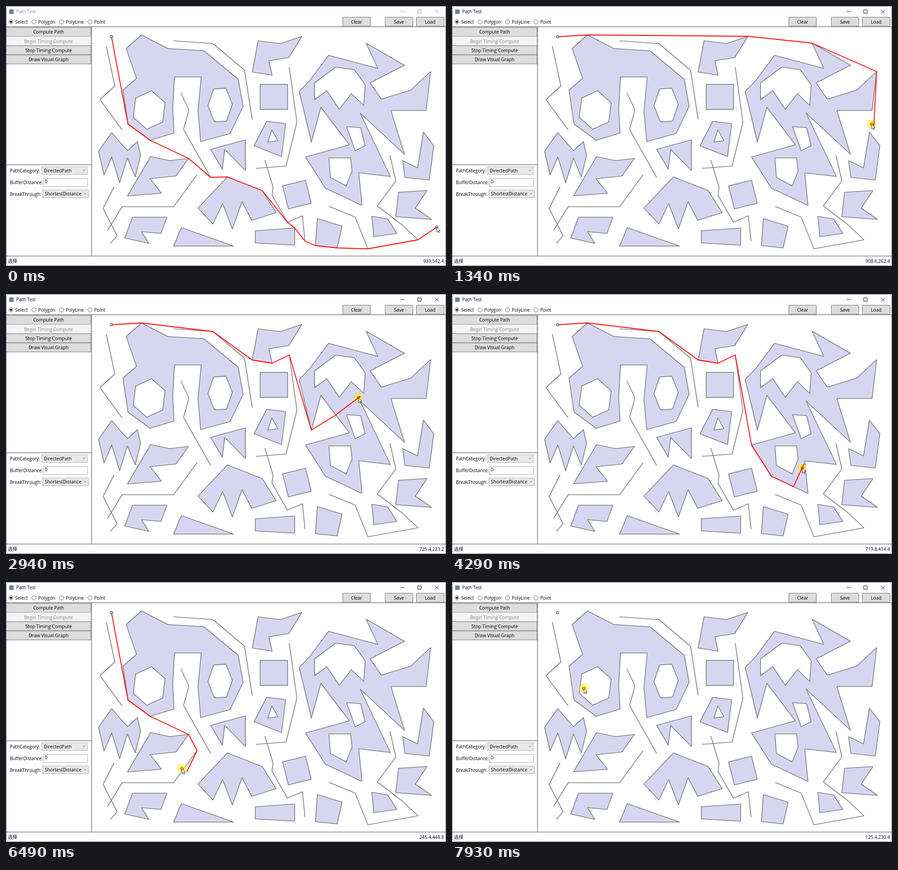
These frames come from a looping animation (974 px wide and 575 px high, 8000 ms). An HTML page with a canvas:

```html
<!DOCTYPE html>
<html lang="en">
<head>
<meta charset="utf-8">
<title>Path Test</title>
<style>
html, body { margin: 0; width: 100%; height: 100%; overflow: hidden; background: #fff; }
canvas { display: block; }
</style>
</head>
<body>
<canvas id="stage" width="974" height="575"></canvas>
<script>
const ctx = document.getElementById('stage').getContext('2d');
const LOOP = 8000, STEP = 79.3, LAST_STEP = 100;
const GREY = '#808080', LAVENDER = '#d7d6f1';

const cross = (a, b, c) => (b.x - a.x) * (c.y - a.y) - (b.y - a.y) * (c.x - a.x);
const dist = (a, b) => Math.hypot(a.x - b.x, a.y - b.y);
const mix = (a, b, t) => ({ x: a.x + (b.x - a.x) * t, y: a.y + (b.y - a.y) * t });
const edgesOf = pts => pts.filter(p => p.next).map(p => [p, p.next]);

function points(...xy) {
  const pts = [];
  for (let i = 0; i < xy.length; i += 2) pts.push({ x: xy[i], y: xy[i + 1] });
  return pts;
}

function ring(n, cx, cy, rx, ry, turn) {
  return Array.from({ length: n }, (_, i) => {
    const a = (turn + 360 * i / n) * Math.PI / 180;
    return { x: cx + rx * Math.cos(a), y: cy + ry * Math.sin(a) };
  });
}

// Two gaps of the given depth between a and b; the middle tooth is the longest.
function teeth(ax, ay, bx, by, depth) {
  return [0, 1, 2, 3, 4].map(i => {
    const p = mix({ x: ax, y: ay }, { x: bx, y: by }, i / 4);
    p.y += i % 2 ? -depth : 15 * Math.sin(Math.PI * i / 4);
    return p;
  });
}

function link(pts, closed) {
  pts.forEach((p, i) => {
    p.prev = pts[i - 1] || (closed ? pts[pts.length - 1] : null);
    p.next = pts[i + 1] || (closed ? pts[0] : null);
  });
  return pts;
}

function addTo(path, pts, closed) {
  pts.forEach((p, i) => i ? path.lineTo(p.x, p.y) : path.moveTo(p.x, p.y));
  if (closed) path.closePath();
  return path;
}

const blocks = [], walls = [];

function block(...rings) {
  const shape = new Path2D();
  rings.forEach(r => addTo(shape, link(r, true), true));
  blocks.push({ outline: rings[0], edges: rings.flatMap(edgesOf), shape });
}

const wall = (...xy) => walls.push(link(points(...xy), false));

// Outlines run clockwise; further rings are holes.
function buildMap() {
  block(
    points(300, 64, 358, 94, 438, 99, 514, 162, 525, 222, 496, 282, 431, 300, 425, 233, 432, 157,
      373, 157, 369, 227, 372, 281, 319, 297, 270, 261, 259, 186, 289, 160, 266, 94),
    ring(6, 317, 230, 38, 43, -82),
    ring(6, 474, 219, 27, 42, -62));
  block(points(558, 77, 608, 83, 655, 67, 626, 114, 582, 121, 589, 153, 545, 146));
  block(ring(4, 593, 201, 43, 39, -135));
  block(points(577, 255, 619, 260, 610, 333, 549, 309), ring(3, 590, 291, 13, 17, -97));
  block(points(453, 317, 530, 296, 530, 364, 484, 317, 479, 361));
  block([...points(205, 321, 234, 280, 269, 320, 291, 300, 298, 331), ...teeth(286, 378, 217, 374, 41)]);
  block(points(320, 333, 362, 342, 404, 337, 376, 376, 319, 382, 344, 414, 269, 420));
  block([...points(425, 447, 490, 378, 567, 408, 598, 457), ...teeth(544, 474, 458, 482, 43)]);
  block(points(280, 467, 356, 467, 343, 503, 300, 499, 316, 525, 263, 513));
  block(points(388, 490, 504, 531, 371, 531));
  block(points(552, 497, 639, 491, 639, 529, 552, 524));
  block(ring(4, 644, 417, 37, 37, -149));
  block(points(689, 470, 744, 487, 733, 535, 685, 530));
  block(points(810, 465, 845, 471, 865, 503, 814, 510));
  block(points(869, 412, 932, 408, 906, 447, 942, 472, 863, 466));
  block(points(924, 279, 947, 309, 937, 385, 883, 379, 878, 342, 911, 358));
  block(
    points(714, 109, 823, 138, 797, 82, 882, 131, 806, 170, 831, 206, 896, 186, 940, 145, 930, 231,
      852, 231, 882, 328, 784, 237, 851, 377, 781, 369, 788, 441, 707, 403, 663, 334, 760, 307,
      697, 224, 676, 301, 649, 189, 674, 163),
    [...points(683, 170, 730, 135, 771, 141, 795, 174), ...teeth(792, 220, 683, 207, 23)],
    points(754, 267, 785, 269, 795, 309, 773, 320),
    points(715, 336, 763, 336, 766, 365, 753, 398, 718, 379));

  wall(222, 89, 241, 177, 208, 207, 257, 274);
  wall(371, 77, 458, 83, 528, 142, 545, 251);
  wall(387, 192, 405, 230, 393, 273, 453, 379);
  wall(627, 135, 644, 257, 620, 354, 553, 359);
  wall(239, 400, 215, 448, 246, 508, 231, 525);
  wall(423, 373, 371, 444, 257, 444, 225, 496);
  wall(573, 341, 591, 400, 589, 419, 623, 478, 656, 464, 662, 520);
  wall(715, 443, 773, 467, 801, 537, 912, 517, 878, 485, 822, 442, 863, 387, 850, 330);
}

buildMap();
const edges = [...blocks.flatMap(b => b.edges), ...walls.flatMap(edgesOf)];
const start = { x: 233.5, y: 68 };
const isConvex = p => cross(p.prev, p, p.next) > 0;
const nodes = [start, ...blocks.flatMap(b => b.outline.filter(isConvex)), ...walls.flat()];

function blocked(a, b) {
  for (const [p, q] of edges) {
    if (p === a || q === a || p === b || q === b) continue;
    if (cross(a, b, p) * cross(a, b, q) < 0 && cross(p, q, a) * cross(p, q, b) < 0) return true;
  }
  return false;
}

// A shortest path only touches a corner along a tangent.
const taut = (node, to) => !node.prev || !node.next ||
  cross(node, to, node.prev) * cross(node, to, node.next) >= 0;

function measureFromStart() {
  nodes.forEach(n => { n.cost = Infinity; });
  start.cost = 0;
  const open = new Set(nodes);
  while (open.size) {
    let near = null;
    for (const n of open) if (!near || n.cost < near.cost) near = n;
    open.delete(near);
    if (near.cost === Infinity) break;
    for (const n of open) {
      const cost = near.cost + dist(near, n);
      if (cost < n.cost && taut(near, n) && taut(n, near) && !blocked(near, n)) {
        n.cost = cost;
        n.from = near;
      }
    }
  }
}

function reach(target) {
  let cost = Infinity, via = null;
  for (const n of nodes) {
    const c = n.cost + dist(n, target);
    if (c < cost && taut(n, target) && !blocked(n, target)) { cost = c; via = n; }
  }
  return { cost, via };
}

function chain(via, ...tail) {
  const pts = [];
  for (let n = via; n; n = n.from) pts.unshift(n);
  return [...pts, ...tail];
}

function route(target) {
  const host = blocks.find(b => ctx.isPointInPath(b.shape, target.x, target.y, 'evenodd'));
  if (!host) {
    const { via } = reach(target);
    return via && chain(via, target);
  }
  // Inside a block: break through at right angles to one of its edges.
  let best = Infinity, path = null;
  for (const [p, q] of host.edges) {
    const len = dist(p, q);
    const s = ((target.x - p.x) * (q.x - p.x) + (target.y - p.y) * (q.y - p.y)) / (len * len);
    if (s <= 0 || s >= 1) continue;
    const foot = mix(p, q, s), depth = dist(foot, target), eps = 0.01 / depth;
    if (blocked(target, mix(target, foot, 1 - eps))) continue;
    const { cost, via } = reach(mix(target, foot, 1 + eps));
    if (via && cost + depth < best) {
      best = cost + depth;
      path = chain(via, foot, target);
    }
  }
  return path;
}

// Stops of the pointer in world units, joined by a smooth spline.
const stop = (step, x, y) => ({ step, x, y });
const stops = [
  stop(0, 939, 542.4), stop(17, 908.6, 262.4), stop(37, 725.4, 223.2), stop(54, 719.8, 414.4),
  stop(65, 554.2, 531.2), stop(82, 245.4, 448.8), stop(100, 125.4, 230.4)
];

function slope(i, axis) {
  const a = stops[i - 1], b = stops[i + 1];
  return a && b ? (b[axis] - a[axis]) / (b.step - a.step) : 0;
}

function pointerAt(step) {
  const i = Math.max(1, stops.findIndex(s => s.step >= step));
  const a = stops[i - 1], b = stops[i], span = b.step - a.step;
  const u = (step - a.step) / span, v = 1 - u;
  const along = axis => v * v * (1 + 2 * u) * a[axis] + u * u * (1 + 2 * v) * b[axis] +
    span * u * v * (v * slope(i - 1, axis) - u * slope(i, axis));
  const wx = 0.6 + 0.8 * Math.round((along('x') - 0.6) / 0.8);
  const wy = 0.8 * Math.round(along('y') / 0.8);
  return { x: 190 + wx / 1.2295, y: 47.8 + wy / 1.2295, label: `${+wx.toFixed(1)},${+wy.toFixed(1)}` };
}

function box(x, y, w, h, fill, stroke) {
  ctx.fillStyle = fill;
  ctx.fillRect(x, y, w, h);
  ctx.strokeStyle = stroke;
  ctx.lineWidth = 1;
  ctx.strokeRect(x, y, w, h);
}

function text(str, x, y, color = '#000', align = 'left') {
  ctx.fillStyle = color;
  ctx.textAlign = align;
  ctx.fillText(str, x, y);
}

function line(color, width, ...xy) {
  ctx.strokeStyle = color;
  ctx.lineWidth = width;
  ctx.stroke(addTo(new Path2D(), points(...xy), false));
}

function circle(p, r, fill, stroke, width = 1) {
  ctx.beginPath();
  ctx.arc(p.x, p.y, r, 0, Math.PI * 2);
  if (fill) { ctx.fillStyle = fill; ctx.fill(); }
  if (stroke) { ctx.strokeStyle = stroke; ctx.lineWidth = width; ctx.stroke(); }
}

function button(label, x, y, w, enabled = true) {
  box(x, y, w, 20, enabled ? '#ddd' : '#f4f4f4', enabled ? '#707070' : '#b8bcbf');
  text(label, x + w / 2, Math.round(y + 10) + 3.7, enabled ? '#000' : '#838383', 'center');
}

function combo(label, x, y) {
  box(x, y, 101, 17, '#e8e8e8', '#acacac');
  text(label, x + 4.5, y + 12.2);
  line('#606060', 1, x + 91, y + 7, x + 93.3, y + 9.3, x + 95.6, y + 7);
}

function drawWindow(active, label) {
  ctx.fillStyle = '#fff';
  ctx.fillRect(0, 0, 974, 575);
  ctx.font = '10.2px "Open Sans", "Noto Sans CJK SC", "Noto Sans CJK", sans-serif';

  const ink = active ? '#000' : '#999';
  ctx.fillStyle = '#6f8794';
  ctx.fillRect(7, 7.5, 10, 10);
  text('Path Test', 22.5, 16.3, ink);
  line(ink, 1, 873.5, 12.5, 882, 12.5);
  ctx.strokeRect(911.5, 8.5, 7.5, 7.5);
  line(ink, 1, 949.7, 8.5, 957.7, 16.5);
  line(ink, 1, 957.7, 8.5, 949.7, 16.5);

  let x = 11;
  for (const name of ['Select', 'Polygon', 'PolyLine', 'Point']) {
    circle({ x, y: 35 }, 4.6, '#fff', '#606060');
    if (name === 'Select') circle({ x, y: 35 }, 2.5, '#111');
    text(name, x + 9.3, 38.7);
    x += 23 + ctx.measureText(name).width;
  }
  button('Clear', 745.5, 24.8, 61);
  button('Save', 839.5, 24.8, 61);
  button('Load', 908.5, 24.8, 61);
  ['Compute Path', 'Begin Timing Compute', 'Stop Timing Compute', 'Draw Visual Graph']
    .forEach((name, i) => button(name, 0.5, 47.2 + 20.3 * i, 187.5, i !== 1));

  ['PathCategory:', 'BufferDistance:', 'BreakThrough:']
    .forEach((name, i) => text(name, 8.5, 368 + 25.8 * i));
  combo('DirectedPath', 79, 355.5);
  box(83.5, 381.5, 97, 17.5, '#fff', '#abadb3');
  text('0', 86, 392.3);
  combo('ShortestDistance', 81.5, 407);

  line(GREY, 1.6, 0, 45.8, 974, 45.8);
  line(GREY, 1.6, 189.4, 46, 189.4, 553);
  line(GREY, 1.6, 0, 351, 189, 351);
  line(GREY, 1.6, 0, 553, 974, 553);
  text('选择', 4.5, 568);
  text(label, 969.5, 568, '#000', 'right');
  ctx.strokeStyle = '#6a6f74';
  ctx.lineWidth = 1;
  ctx.strokeRect(0.5, 0.5, 973, 574);
}

function drawMap() {
  ctx.strokeStyle = GREY;
  ctx.lineWidth = 1.7;
  ctx.fillStyle = LAVENDER;
  for (const { shape } of blocks) {
    ctx.fill(shape, 'evenodd');
    ctx.stroke(shape);
  }
  for (const w of walls) ctx.stroke(addTo(new Path2D(), w, false));
}

function drawCursor({ x, y }) {
  const arrow = addTo(new Path2D(), points(
    x, y, x, y + 11, x + 2.5, y + 8.7, x + 4.2, y + 12.5,
    x + 5.9, y + 11.7, x + 4.2, y + 8, x + 7.6, y + 8), true);
  ctx.fillStyle = '#fff';
  ctx.fill(arrow);
  ctx.strokeStyle = '#000';
  ctx.lineWidth = 0.8;
  ctx.stroke(arrow);
}

function draw(step) {
  const pointer = pointerAt(step);
  const active = step > 0;
  drawWindow(active, pointer.label);
  drawMap();
  if (active) circle(pointer, 9.8, 'rgba(255,238,20,.65)');

  // The computed path trails the pointer by one step.
  const path = route(pointerAt(Math.max(0, step - 1)));
  if (path) {
    ctx.strokeStyle = '#f00';
    ctx.lineWidth = 1.8;
    ctx.stroke(addTo(new Path2D(), path, false));
  }
  circle(start, 2.7, 'rgba(214,214,240,.6)', '#6c6c6c', 1.5);
  circle(pointer, 2.7, null, active ? '#c8501e' : '#6c6c6c', 1.5);
  drawCursor(pointer);
}

let origin, shown = -1;
function tick(now) {
  origin ??= now;
  const t = (now - origin) % LOOP;
  const step = Math.min(LAST_STEP, Math.floor((t + 16) / STEP));
  if (step !== shown) draw(shown = step);
  requestAnimationFrame(tick);
}

ctx.lineJoin = 'round';
measureFromStart();
requestAnimationFrame(tick);
</script>
</body>
</html>
```
